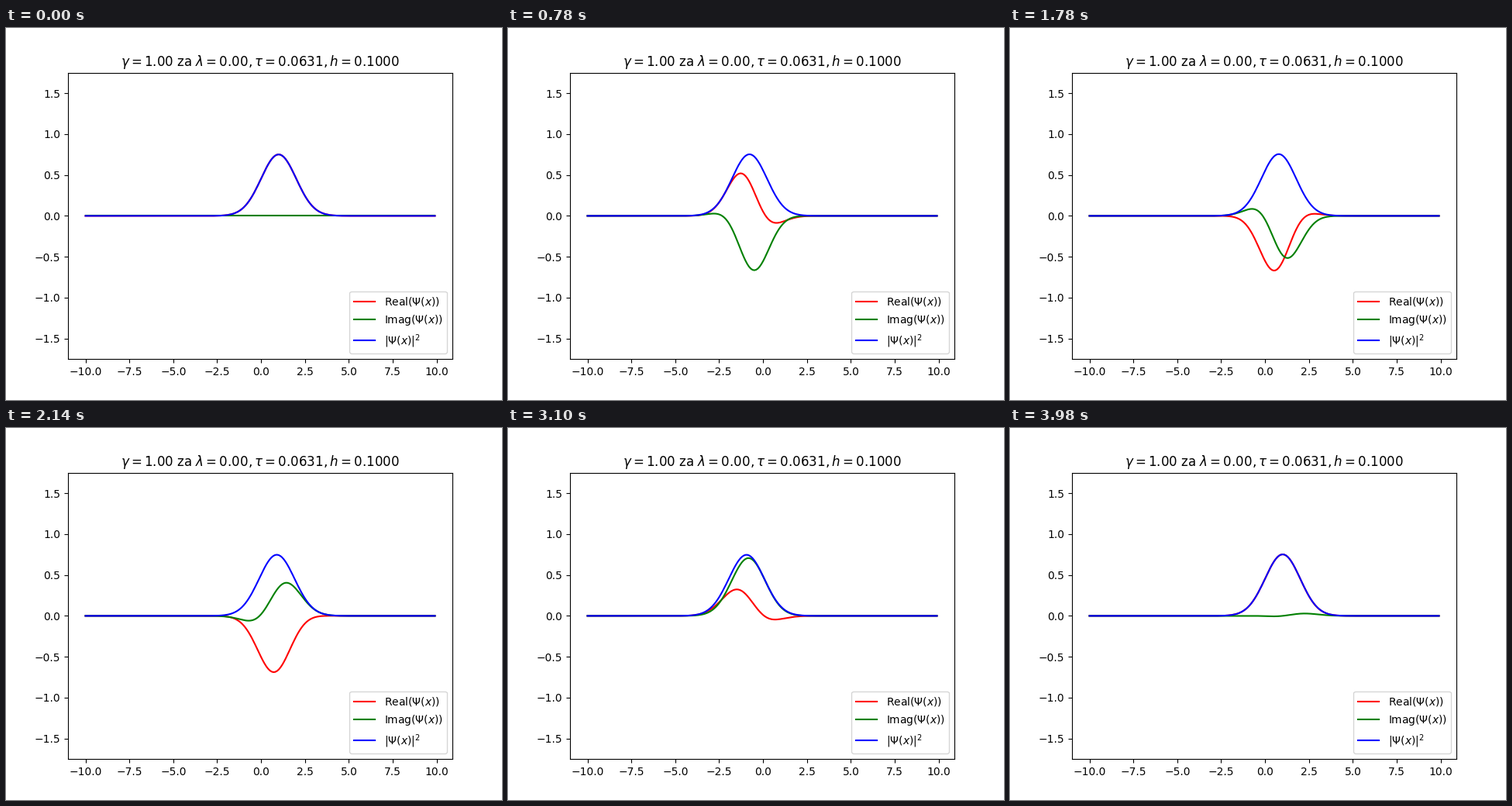
Write a matplotlib script that moves like this. It is 640 px wide and 480 px high and loops after 4 s.

```python
import numpy as np
import matplotlib.pyplot as plt
from matplotlib.animation import FuncAnimation

FRAMES = 200
LEVELS = 30
H = 0.1
LAM = 0.0
TAU = 4 * np.pi / (FRAMES - 1)
SHIFT = 1.0  # initial displacement of the packet

x = np.arange(-10, 10 - H / 2, H)


def oscillator_states(x, count):
    """Normalised eigenfunctions of the harmonic oscillator."""
    states = [np.pi ** -0.25 * np.exp(-x ** 2 / 2)]
    states.append(np.sqrt(2) * x * states[0])
    for n in range(2, count):
        states.append(np.sqrt(2 / n) * x * states[-1]
                      - np.sqrt((n - 1) / n) * states[-2])
    return np.array(states)


def coherent_weights(shift, count):
    n = np.arange(1, count)
    ratios = shift / np.sqrt(2 * n)
    return np.exp(-shift ** 2 / 4) * np.cumprod(np.r_[1.0, ratios])


states = oscillator_states(x, LEVELS)
weights = coherent_weights(SHIFT, LEVELS)
half = 0.5j * TAU * (np.arange(LEVELS) + 0.5)
step = (1 - half) / (1 + half)  # Crank-Nicolson factor of each level


def psi(k):
    return (weights * step ** k) @ states


def parts(k):
    p = psi(k)
    return p.real, p.imag, np.abs(p)


fig, ax = plt.subplots(figsize=(6.4, 4.8), dpi=100)
styles = [("r", r"Real($\Psi(x)$)"),
          ("g", r"Imag($\Psi(x)$)"),
          ("b", r"$|\Psi(x)|^2$")]
lines = [ax.plot(x, y, color=c, label=name)[0]
         for y, (c, name) in zip(parts(0), styles)]

top = 1 + np.pi ** -0.25
ax.set_ylim(-top, top)
ax.set_title(rf"$\gamma = {SHIFT:.2f}$ za $\lambda = {LAM:.2f}, "
             rf"\tau = {TAU:.4f}, h = {H:.4f}$")
ax.legend(loc="lower right")


def update(k):
    for line, y in zip(lines, parts(k)):
        line.set_ydata(y)
    return lines


anim = FuncAnimation(fig, update, frames=FRAMES, interval=20,
                     repeat=True, repeat_delay=0)
plt.show()
```
